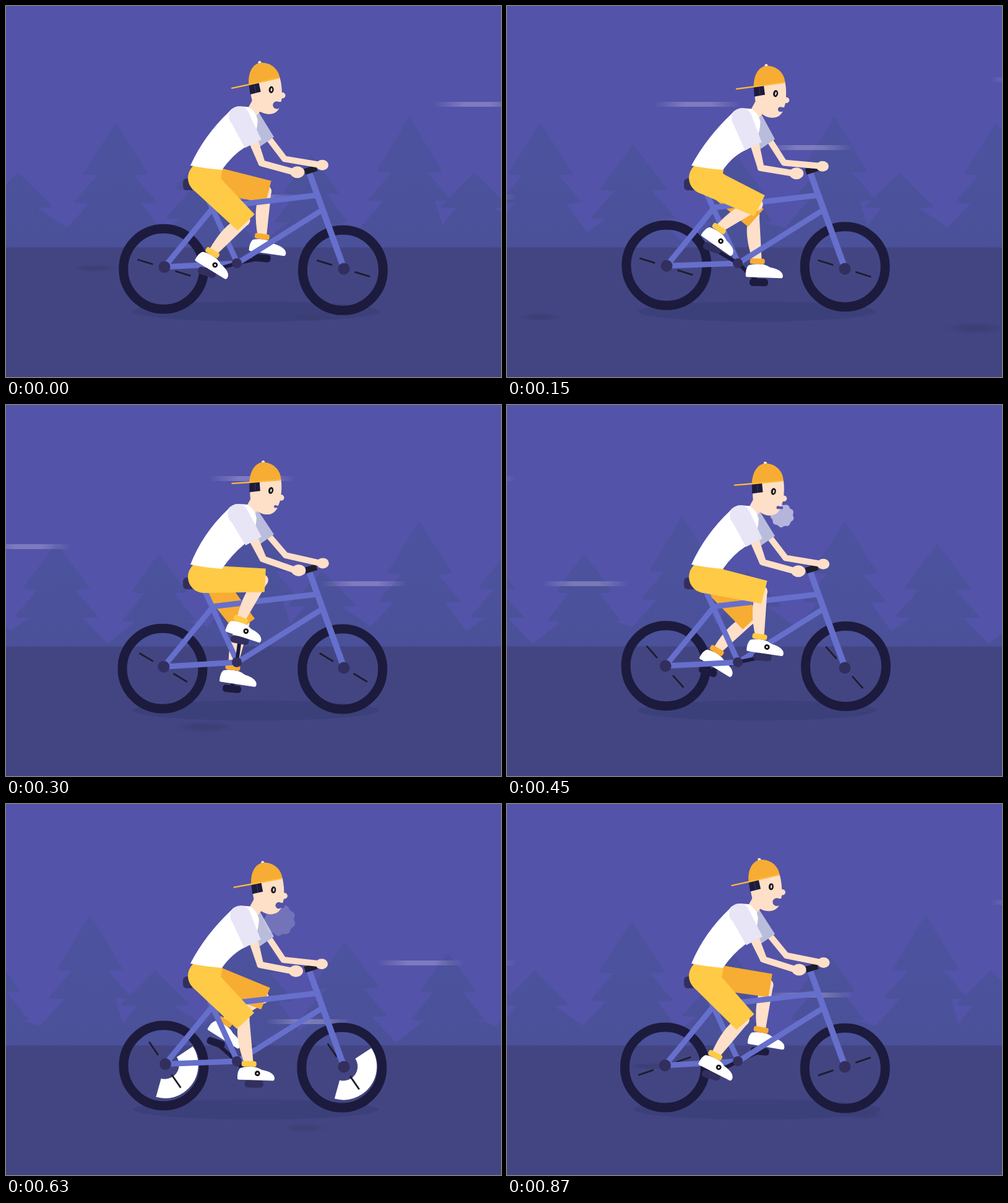
An HTML page with a canvas for the animation above (900 ms loop, 800 px wide and 600 px high).

```html
<!DOCTYPE html>
<html lang="en">
<head>
<meta charset="utf-8">
<title>Evening ride</title>
<style>
html, body { margin: 0; width: 100%; height: 100%; overflow: hidden; background: #5353a9; }
canvas { display: block; width: 800px; height: 600px; }
</style>
</head>
<body>
<canvas id="stage" width="800" height="600"></canvas>
<script>
const ctx = document.getElementById('stage').getContext('2d');
const LOOP = 900, STEP = 30, RAD = Math.PI / 180, TAU = Math.PI * 2;
const C = {
  sky: '#5353a9', ground: '#434583', shade: '#3c407a', tire: '#1c1b3d', hub: '#322f5e',
  frame: '#666fcb', skin: '#fedfc8', near: '#ffca46', far: '#f7ac33', sleeve: '#e7e5f6',
  farSleeve: '#b9bddb', ink: '#1e1d2c', white: '#fff'
};

// Drawing helpers
function trace(pts) {
  ctx.beginPath();
  pts.forEach(([x, y]) => ctx.lineTo(x, y));
}
function poly(pts, fill) {
  trace(pts);
  ctx.fillStyle = fill;
  ctx.fill();
}
function shape(d, fill) {
  ctx.fillStyle = fill;
  ctx.fill(new Path2D(d));
}
function line(pts, color, width, cap = 'round') {
  trace(pts);
  ctx.strokeStyle = color;
  ctx.lineWidth = width;
  ctx.lineCap = cap;
  ctx.lineJoin = 'round';
  ctx.stroke();
}
function oval(x, y, rx, ry, fill, rot = 0) {
  ctx.beginPath();
  ctx.ellipse(x, y, rx, ry, rot, 0, TAU);
  ctx.fillStyle = fill;
  ctx.fill();
}
const disc = (x, y, r, fill) => oval(x, y, r, r, fill);
function box(x, y, w, h, r, fill) {
  ctx.beginPath();
  ctx.roundRect(x, y, w, h, r);
  ctx.fillStyle = fill;
  ctx.fill();
}
function at(x, y, deg, draw) {
  ctx.save();
  ctx.translate(x, y);
  ctx.rotate(deg * RAD);
  draw();
  ctx.restore();
}
function turn(x, y, deg) {
  const c = Math.cos(deg * RAD), s = Math.sin(deg * RAD);
  return [x * c - y * s, x * s + y * c];
}
function fade(g, stops) {
  stops.forEach(([o, color]) => g.addColorStop(o, color));
  return g;
}

// Motion rules; one turn of the crank takes the whole loop
const wave = (t, peak, turns = 1) => Math.cos((t - peak) * turns * TAU / LOOP);
const bobAt = t => wave(t, 120, 2);
const footTilt = t => 17.3 + 16.9 * wave(t, 117) + 3.8 * wave(t, 62, 2);
const headTilt = t => 2.6 + 4.7 * wave(t, 345);
const mouthSize = t => 4.6 + 2.4 * wave(t, 800);
// Three wheel turns with a short surge
const spin = t => 17 + 1.2 * t + 33 * Math.exp(-(((t - 420) / 130) ** 2));
const cross = (enter, t, speed) => 860 - speed * ((t - enter + LOOP) % LOOP);

// Forest: x, top, half width and drop of the first tier, floor of the dip to the right
const SPAN = 737;
const TREES = [
  [20, 271, 53, 53, 360],
  [177, 191, 51, 80, 368],
  [327, 226, 52, 70, 388],
  [493, 243, 43, 59, 360],
  [652, 181, 51, 86, 358]
];
const leaf = fade(ctx.createLinearGradient(0, 180, 0, 390),
  [[0, '#4d52a0'], [.6, '#4b529b'], [1, '#4a5199']]);

// Height and entry slot of each streak; height, entry time and radii of each smudge
const STREAKS = [[159, 0], [229, 1], [119, 3], [289, 4], [352, 9], [257, 10], [309, 13]];
const SMUDGES = [[521, 114, 50, 10], [503, -128, 37, 7], [524, 500, 37, 7], [424, 653, 38, 6]];

function forest(t) {
  const n = TREES.length;
  for (let i = 0; i < n * 3; i++) {
    const [x, top, w, drop, dip] = TREES[i % n];
    const prev = TREES[(i + n - 1) % n], next = TREES[(i + 1) % n];
    const half = other => ((other[0] - x + 1.5 * SPAN) % SPAN - SPAN / 2) / 2;
    const tiers = [[w, top + drop, w / 2]];
    if (drop > 55) tiers.push([w + 14, top + drop + 46, (w + 14) * .6]);
    const side = s => tiers.flatMap(([out, y, neck]) => [[s * out, y], [s * neck, y + 1]]);
    const l = half(prev), r = half(next);
    const pts = [[l, 391], [l, prev[4]], ...side(-1).reverse(), [0, top], ...side(1), [r, dip], [r, 391], [l, 391]];
    at(x + Math.floor(i / n) * SPAN - SPAN * t / LOOP, 0, 0, () => {
      poly(pts, leaf);
      line(pts, leaf, 3);
    });
  }
}

function streaks(t) {
  for (const [y, slot] of STREAKS) {
    at(cross(60 * slot - 33, t, 3.02), y, 0, () => {
      const tint = a => `rgba(255,240,255,${a})`;
      ctx.fillStyle = fade(ctx.createLinearGradient(-70, 0, 70, 0),
        [[0, tint(0)], [.35, tint(.25)], [.65, tint(.25)], [1, tint(0)]]);
      ctx.fillRect(-70, -4, 140, 8);
    });
  }
}

function smudges(t) {
  for (const [y, enter, rx, ry] of SMUDGES) {
    at(cross(enter, t, 2.9), y, 0, () => {
      ctx.scale(rx, ry);
      disc(0, 0, 1, fade(ctx.createRadialGradient(0, 0, 0, 0, 0, 1),
        [[0, 'rgba(58,62,116,.9)'], [.5, 'rgba(58,62,116,.7)'], [1, 'rgba(58,62,116,0)']]));
    });
  }
}

// The tire sits slightly off its axle; a white arc sweeps once around it
function wheel(x, y, off, t) {
  const a = spin(t), [ox, oy] = turn(0, off, a);
  ctx.beginPath();
  ctx.arc(x + ox, y + oy, 65, 0, TAU);
  ctx.strokeStyle = C.tire;
  ctx.lineWidth = 15;
  ctx.stroke();
  const u = (t - 500) / 282;
  if (u > 0 && u < 1) {
    const from = (424 * u ** 2.6 - 90) * RAD, to = (424 * u - 90) * RAD;
    ctx.beginPath();
    ctx.arc(x, y, 54, from, to);
    ctx.arc(x, y, 23, to, from, true);
    ctx.fillStyle = C.white;
    ctx.fill();
  }
  at(x, y, a, () => {
    for (const s of [-1, 1]) line([[19 * s, 0], [45 * s, 0]], C.ink, 2.8, 'butt');
  });
}

// One crank, pedal and leg; the knee comes from two fixed bone lengths
function leg(p, far) {
  const tilt = footTilt(p), [cx, cy] = turn(41, 0, 162 + .4 * p);
  let sx = 379.5 + cx - .35 * tilt, sy = 414.3 + cy * .975;
  const [dx, dy] = turn(-2, 6, tilt), px = sx + dx, py = sy + dy;
  line([[373, 416], [px, py]], C.tire, 6);
  at(px, py, tilt * .6, () => box(-15, -6, 30, 12, 5, far ? C.tire : C.hub));
  if (far) { sx += 5.5; sy -= 1.8; }

  const [hx, hy] = far ? [328, 277] : [320, 278];
  const [fx, fy] = turn(-11, -26, tilt), ax = sx + fx, ay = sy + fy;
  const d = Math.hypot(ax - hx, ay - hy), thigh = 95, shin = 73;
  const bend = Math.acos(Math.min(1, (thigh ** 2 + d * d - shin ** 2) / (2 * thigh * d)));
  const aim = (Math.atan2(ay - hy, ax - hx) - bend) / RAD;
  const limb = (along, side) => {
    const [x, y] = turn(along, side, aim);
    return [hx + x, hy + y];
  };

  const [kx, ky] = limb(94, 0);
  const len = Math.hypot(ax - kx, ay - ky), down = Math.atan2(ay - ky, ax - kx) / RAD;
  at(kx, ky, down, () => {
    disc(0, 0, 10, C.skin);
    shape(`M0-9.5L${len}-7V7Q30 18 6 9Z`, C.skin);
  });

  const cloth = far ? C.far : C.near;
  if (!far) {
    disc(hx, hy, 26, cloth);
    poly([[304, 262], [350, 264], [347, 281], [hx, hy]], cloth);
  }
  poly([limb(0, -19), limb(99, -19), limb(99, 19), limb(0, far ? 22 : 26)], cloth);

  at(sx, sy, tilt, () => {
    shape('M-29-1Q-30-14-25-19Q-13-23 0-21Q5-20 10-17Q30-14 31-4Q31 0 28 0L-27 0Z', C.white);
    box(-23, -30.5, 24, 9, 3.5, cloth);
    if (!far) {
      disc(3, -11, 4.4, '#111');
      disc(3, -11, 1.6, C.white);
    }
  });
}

function frame(hub) {
  const bb = [374, 416];
  box(286, 279, 34, 19, 6, C.hub);
  line([[321, 300], bb], C.frame, 9);
  line([[333, 326], [503, 306]], C.frame, 9);
  line([bb, [511, 330]], C.frame, 9);
  line([[334, 327], hub, bb], C.frame, 9);
  line([[491, 272], [546, 424]], C.frame, 10);
  disc(...hub, 9.5, C.hub);
  disc(546, 425, 9.5, C.hub);
}

function puff(t) {
  const u = (t - 370) / 350;
  if (u <= 0 || u >= 1) return;
  const R = 28 * u ** .25, x = 446 - 5 * u, y = 175 + 17 * u;
  ctx.beginPath();
  ctx.arc(x, y, R * .9, 0, TAU);
  for (let i = 0; i < 9; i++) {
    const [ox, oy] = turn(R * .7, 0, i * 40 + 17);
    ctx.moveTo(x + ox + R * .29, y + oy);
    ctx.arc(x + ox, y + oy, R * .29, 0, TAU);
  }
  ctx.fillStyle = `rgba(245,245,255,${.78 * (1 - u)})`;
  ctx.fill();
}

function head(t, b) {
  at(393.4 + 4 * b, 154.3 + 3.3 * b, headTilt(t), () => {
    ctx.translate(-393, -154);
    disc(447, 145.5, 4.8, C.skin);
    shape('M395 127L443 116Q447 130 446 150L444 158Q441 175 425 175.5Q409 175 400 160Q395 148 395 127Z', C.skin);
    const m = mouthSize(t), mx = 440.5 - .45 * m;
    oval(mx, 161, m, m * .95, C.sky);
    box(mx, 161 - m * .8, 447 - mx, m * 1.5, 1, C.sky);
    poly([[393, 127], [409, 124], [412, 139], [395, 143]], C.tire);
    line([[402, 128], [404, 140]], '#3a3862', 1);
    disc(411, 92, 2.6, '#fff0dc');
    shape('M393 128C391 106 401 92 414 92C430 92 442 104 443 117Z', C.far);
    line([[365.5, 132.5], [394, 127], [442, 117]], '#fdb93b', 2.4);
    oval(429, 136, 4, 5.6, '#15141c', .1);
    oval(429.3, 136, 1.3, 2.9, '#e8dccb', .1);
  });
}

function rider(t, b) {
  const sx = 2.7 * b, sy = 3 * b;
  const sway = (...pts) => pts.map(([x, y]) => [x + sx, y + sy]);

  // Far arm and grip
  line([[483, 268], [502, 262]], C.ink, 10, 'butt');
  line([[423, 212 + sy], [450 - 2.5 * b, 248 + 6 * b], [506, 257 + 2 * b]], C.skin, 10);
  oval(511 - 1.2 * b, 257.5 + 2 * b, 10, 8.5, C.skin);
  poly([...sway([400, 168], [408, 171]), [433, 212 + 3.5 * b], [410, 228 + 3.5 * b], [396, 200]], C.farSleeve);
  puff(t);

  // Neck and shirt
  poly(sway([390, 168], [401, 148], [416, 165], [405, 178]), C.skin);
  const P = (x, y) => `${x + sx} ${y + sy} `;
  shape(`M298 258Q${P(320, 210)}${P(361, 171)}Q${P(367, 162.5)}${P(379, 162.5)}L${P(392, 163.5)}` +
    `Q${P(403, 169)}${P(407, 184)}Q${P(407, 200)}${P(400, 214)}L${P(386, 229)}Q366 241 349 265Q322 263 298 258Z`, C.white);
  head(t, b);

  // Near arm
  const ex = 412.7 - 3 * b, ey = 255 + 7.5 * b;
  poly([[393, 222 + sy], [407, 216 + sy], [ex + 5, ey - 4], [ex - 4, ey + 4]], C.skin);
  line([[ex, ey], [464 - 3 * b, 268.5 + 2 * b]], C.skin, 10.5);
  oval(470.5 - 3 * b, 269 + 2 * b, 11.5, 9.5, C.skin);
  disc(377 + sx, 179 + sy, 16.5, C.sleeve);
  poly([...sway([360.8, 182], [391.5, 171]), [412.5 - b, 216.5 + 4 * b], [386 - 1.5 * b, 230 + 3.7 * b]], C.sleeve);
}

function draw(t) {
  const b = bobAt(t), hub = [256.3 + 1.8 * b, 421.8 - 1.8 * b];
  ctx.fillStyle = C.sky;
  ctx.fillRect(0, 0, 800, 600);
  forest(t);
  streaks(t);
  ctx.fillStyle = C.ground;
  ctx.fillRect(0, 390.5, 800, 210);
  oval(404, 494, 196 + 4 * Math.cos(spin(t) * RAD), 16.5, C.shade);
  smudges(t);
  wheel(hub[0] - .7, hub[1] + 1.2, 2.2, t);
  wheel(545.3, 424.5, 3, t);
  leg((t + LOOP / 2) % LOOP, true);
  frame(hub);
  leg(t, false);
  disc(373, 416, 8, C.hub);
  rider(t, b);
}

function tick() {
  draw(Math.floor(performance.now() % LOOP / STEP) * STEP);
  requestAnimationFrame(tick);
}
tick();
</script>
</body>
</html>
```
